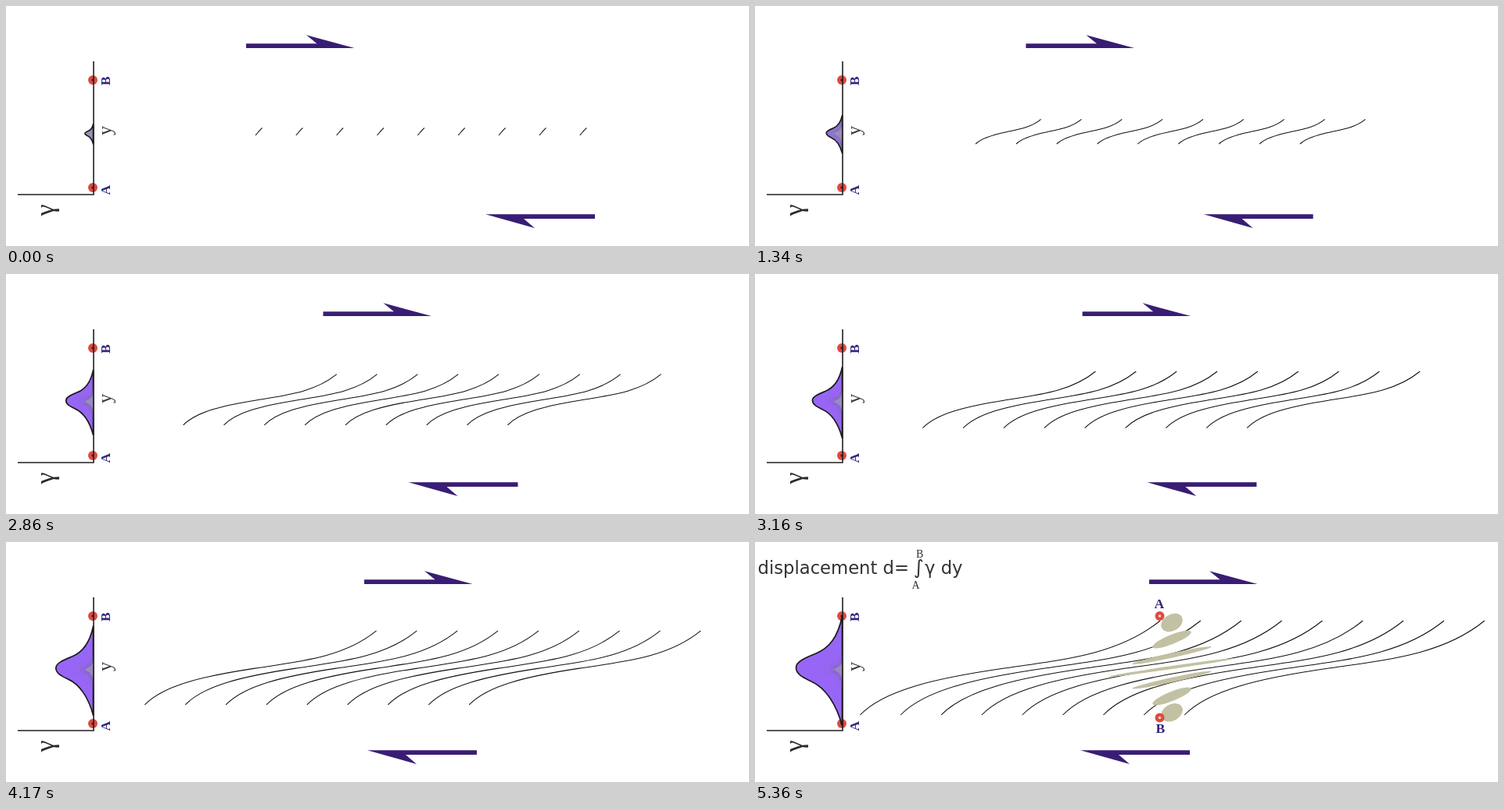
These frames come from a looping animation (950 by 308 pixels, 6.82 s). An HTML page:

```html
<!DOCTYPE html>
<html lang="en">
<head>
<meta charset="utf-8">
<title>Shear displacement</title>
<style>
  html, body { margin: 0; width: 100%; height: 100%; overflow: hidden; background: #fff; }
  svg { display: block; width: 950px; height: 308px; }
  .serif { font-family: "Liberation Serif", serif; }
  .sans { font: 22.7px "DejaVu Sans", sans-serif; fill: #333; }
  .label { font-size: 17.5px; font-weight: bold; fill: #33267c; }
  .axis { fill: none; stroke: #221f20; stroke-width: 1.6; }
  .arrow { fill: #391d74; }
  .dot { fill: #dc4b40; }
  .strain { fill: #c2c1a3; }
  #curves { fill: none; stroke: #111; stroke-width: 1.05; }
  #bell { stroke: #1c1a20; stroke-width: 1.7; stroke-linejoin: round; }
  #rings { fill: none; stroke: #6e6487; stroke-width: 1; }
</style>
</head>
<body>
<svg viewBox="0 0 950 308">
  <g class="dot">
    <circle cx="111" cy="95" r="6"/>
    <circle cx="111" cy="233" r="6"/>
  </g>
  <g fill="#5c1c20">
    <circle cx="111" cy="95" r="1.8"/>
    <circle cx="111" cy="233" r="1.8"/>
  </g>
  <path id="bell"/>
  <g id="rings"></g>
  <path class="axis" d="M112 71V242H15"/>

  <g class="serif">
    <text class="label" transform="translate(132.5 102) rotate(-90)">B</text>
    <text class="label" transform="translate(132.5 242.5) rotate(-90)">A</text>
    <text transform="translate(134.5 166) rotate(-90)" font-size="24.5" fill="#3a3844">y</text>
    <text transform="translate(60.5 262) rotate(-90)" font-size="34" text-anchor="middle" fill="#2a2830">γ</text>
  </g>

  <polygon id="top" class="arrow" points="307,48.3 397.5,48.3 384,37.3 445.5,54 307,54"/>
  <polygon id="bottom" class="arrow" points="753,273 662,273 676,285 613,267.3 753,267.3"/>
  <g id="curves"></g>

  <g id="result">
    <g id="ellipses" class="strain"></g>
    <g class="dot">
      <circle cx="517.5" cy="95" r="6"/>
      <circle cx="517.5" cy="225.5" r="6"/>
    </g>
    <g fill="#f6d5cf">
      <circle cx="517.5" cy="95" r="1.8"/>
      <circle cx="517.5" cy="225.5" r="1.8"/>
    </g>
    <g class="serif">
      <text class="label" x="510.5" y="85">A</text>
      <text class="label" x="512.5" y="245">B</text>
      <text x="206" y="20" font-size="14" fill="#333">B</text>
      <text x="200.5" y="59.5" font-size="14" fill="#333">A</text>
    </g>
    <text class="sans" x="3.5" y="41">displacement d=</text>
    <text class="sans" x="202.5" y="41" style="font-size:25px">∫</text>
    <text class="sans" x="217" y="41">γ dy</text>
  </g>
</svg>
<script>
const LOOP = 6820, LAST = 30, GAP = 51.85, SHIFT = 6.567;
const TIMES = [0, 530, 730, 860, 1060, 1190, 1340, 1540, 1670, 1870, 2000,
  2200, 2330, 2530, 2660, 2860, 2990, 3160, 3360, 3510, 3640,
  3840, 3970, 4170, 4300, 4500, 4700, 4830, 5030, 5160, 5360];

// Marker line: control points before and after shearing
const LINE_A = [[319, 165.8], [320.5, 164.3], [321.5, 163], [322.7, 161.5],
  [324.5, 159.8], [326, 158], [327.5, 156.4]];
const LINE_B = [[134.3, 222], [165, 190], [230, 175], [317, 162.3],
  [395, 151], [465, 144.5], [518, 101]];
const BELL = [[111.5, 95], [106, 122], [95, 136], [78, 143], [66, 148], [52.5, 153],
  [52.5, 161], [52.5, 170], [62, 174], [72, 179], [90, 187], [104, 208], [111.5, 236]];

const $ = id => document.getElementById(id);
const mix = (a, b, p) => a + (b - a) * p;

function add(parent, tag, attrs = {}) {
  const el = document.createElementNS("http://www.w3.org/2000/svg", tag);
  for (const key in attrs) el.setAttribute(key, attrs[key]);
  return parent.appendChild(el);
}

const toPath = pts => "M" + pts.map(p => p.map(v => v.toFixed(2)).join(" ")).join(" ").replace(/^(\S+ \S+) /, "$1C");

const linePath = p => toPath(LINE_A.map((a, i) => a.map((v, j) => mix(v, LINE_B[i][j], p))));

function bellPath(p) {
  const s = mix(0.18, 1, p), cy = mix(163.5, 161, p);
  return toPath(BELL.map(([x, y]) => [111.5 + (x - 111.5) * s, cy + (y - 161) * s])) + "Z";
}

// Grey at first, saturated violet from the tenth step
function bellColour(k) {
  const p = Math.min(1, k / 10);
  const rgb = [[155, 152], [147, 102], [182, 246]].map(([a, b]) => Math.round(mix(a, b, p)));
  return `rgb(${rgb})`;
}

const lines = Array.from({ length: 9 }, (_, i) =>
  add($("curves"), "path", { transform: `translate(${i * GAP} 0)` }));

const rings = [0, 2, 4, 7, 10].map((step, i) => ({
  step,
  el: add($("rings"), "path", {
    d: bellPath(step / LAST),
    opacity: [0.8, 0.55, 0.4, 0.2, 0.12][i],
    fill: i ? "none" : "#9b93b2"
  })
}));

[[103.5, 14.7, 10.5, 30], [125, 26.5, 6, 22], [145.5, 52, 3, 12.3], [161, 81, 2, 8.3],
 [177, 52, 3, 12.3], [198, 26.5, 6, 22], [218.8, 14.7, 10.5, 30]].forEach(([y, rx, ry, tilt]) =>
  add($("ellipses"), "ellipse", { rx, ry, transform: `translate(533 ${y}) rotate(${-tilt})` }));

let shown = -1;

function draw(k) {
  const p = k / LAST, d = linePath(p);
  lines.forEach(el => el.setAttribute("d", d));
  $("bell").setAttribute("d", bellPath(p));
  $("bell").setAttribute("fill", bellColour(k));
  rings.forEach(({ step, el }) => el.setAttribute("visibility", step < k ? "visible" : "hidden"));
  $("top").setAttribute("transform", `translate(${k * SHIFT} 0)`);
  $("bottom").setAttribute("transform", `translate(${-k * SHIFT} 0)`);
  $("result").setAttribute("visibility", k === LAST ? "visible" : "hidden");
}

function tick() {
  const t = performance.now() % LOOP;
  const k = TIMES.filter(v => v <= t).length - 1;
  if (k !== shown) draw(shown = k);
  requestAnimationFrame(tick);
}
tick();
</script>
</body>
</html>
```
